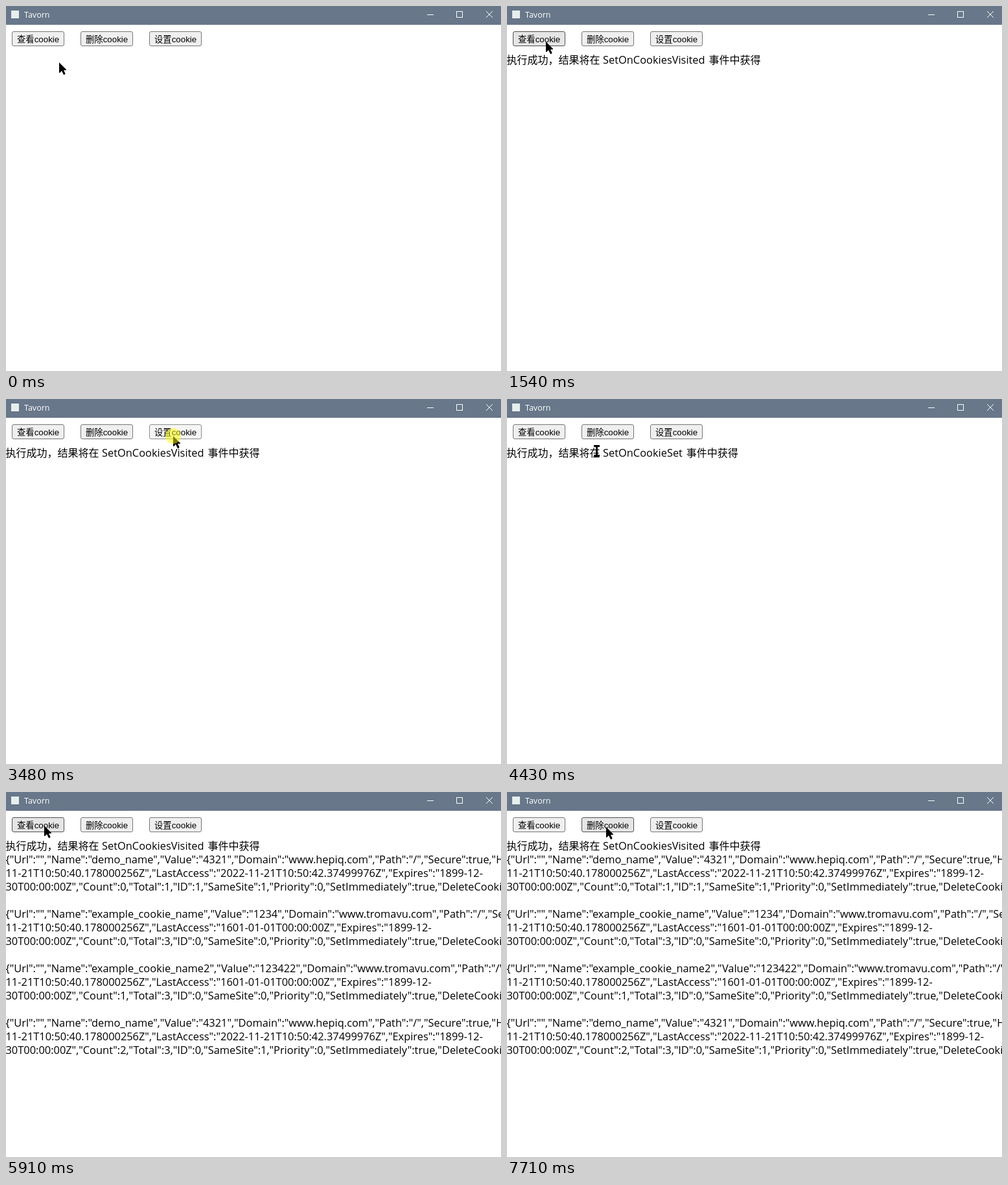
Recreate the animation shown at these times as an HTML page with a canvas. Size 764 px wide and 563 px high, loop 8 s.

```html
<!DOCTYPE html>
<html lang="zh-CN">
<head>
<meta charset="utf-8">
<title>Cookie demo</title>
<style>
html, body { margin: 0; width: 100%; height: 100%; overflow: hidden; background: #fff; }
canvas { display: block; }
</style>
</head>
<body>
<canvas id="stage" width="764" height="563"></canvas>
<script>
const ctx = document.getElementById('stage').getContext('2d');
const LOOP = 8000, TICK = 66.6;
const LATIN = '16.4px "Open Sans", sans-serif';
const HAN = '16px "Noto Sans CJK SC", "Noto Sans CJK", sans-serif';
const BUTTON_HAN = '13.333px "Noto Sans CJK SC", "Noto Sans CJK", sans-serif';
const BUTTON_LATIN = '13.333px "Liberation Sans", Arial, sans-serif';

const buttons = [[9, '查看'], [115, '删除'], [221, '设置']];

// Pointer moves: start time, steps, then [progress, x, y] points to pass through
const moves = [
  [660, 6, [[0, 82, 87], [1, 60, 55]]],
  [2000, 12, [[0, 60, 55], [7 / 12, 148, 55], [1, 258, 57]]],
  [4090, 12, [[0, 258, 57], [0.5, 138, 80], [1, 66, 58]]],
  [4910, 2, [[0, 66, 58], [1, 59, 52]]],
  [6770, 10, [[0, 59, 52], [0.1, 62, 51], [1, 158, 42]]],
  [7640, 2, [[0, 158, 42], [1, 153, 54]]]
];
const presses = [1340, 3480, 5780];
const PRESS = 130;

const messages = [
  [1470, 'SetOnCookiesVisited'],
  [3610, 'SetOnCookieSet'],
  [5910, 'SetOnCookiesVisited']
];
const DUMP_AT = 5910;

function record(name, value, domain, access, count, total, id, site) {
  return [
    `{"Url":"","Name":"${name}","Value":"${value}","Domain":"${domain}","Path":"/","Secure":true,"Httponly"`,
    `11-21T10:50:40.178000256Z","LastAccess":"${access}","Expires":"1899-12-`,
    `30T00:00:00Z","Count":${count},"Total":${total},"ID":${id},"SameSite":${site},"Priority":0,"SetImmediately":true,"DeleteCookies"`,
    ''
  ];
}
const recent = '2022-11-21T10:50:42.37499976Z', never = '1601-01-01T00:00:00Z';
const siteA = 'www.hepiq.com', siteB = 'www.tromavu.com';
const dump = [
  record('demo_name', '4321', siteA, recent, 0, 1, 1, 1),
  record('example_cookie_name', '1234', siteB, never, 0, 3, 0, 0),
  record('example_cookie_name2', '123422', siteB, never, 1, 3, 0, 0),
  record('demo_name', '4321', siteA, recent, 2, 3, 0, 1)
].flat();

// Smooth curve through the points (Lagrange)
function curve(points, u, axis) {
  return points.reduce((sum, p) => sum + points.reduce(
    (w, q) => q === p ? w : w * (u - q[0]) / (p[0] - q[0]), p[axis]), 0);
}

function pointerAt(t) {
  const move = moves.filter(m => m[0] <= t).pop();
  if (!move) return [82, 87];
  const [start, steps, points] = move;
  const u = Math.min(steps, Math.floor((t - start) / TICK) + 1) / steps;
  return [1, 2].map(axis => Math.round(curve(points, u, axis)));
}

function text(str, x, y, font, color = '#000') {
  ctx.font = font;
  ctx.fillStyle = color;
  ctx.fillText(str, x, y);
}

function line(...pts) {
  ctx.beginPath();
  for (let i = 0; i < pts.length; i += 2) ctx.lineTo(pts[i], pts[i + 1]);
}

function titleBar() {
  ctx.fillStyle = '#68778a';
  ctx.fillRect(0, 0, 764, 29);
  ctx.fillStyle = '#e6eeee';
  ctx.fillRect(8, 7, 12, 12);
  text('Tavorn', 28, 18, '12.5px "Open Sans", sans-serif', '#fff');
  ctx.strokeStyle = '#fff';
  ctx.lineWidth = 1;
  line(650, 13.5, 660, 13.5);
  ctx.stroke();
  ctx.strokeRect(695.5, 8.5, 9, 9);
  line(741, 8, 751, 18);
  ctx.stroke();
  line(751, 8, 741, 18);
  ctx.stroke();
}

function button([x, label], hover, down) {
  const [fill, edge] = hover ? (down ? ['#f5f5f5', '#8d8d8d'] : ['#e5e5e5', '#4f4f4f'])
    : ['#efefef', '#767676'];
  ctx.beginPath();
  ctx.roundRect(x + 0.5, 39.5, 80, 22, 2.5);
  ctx.fillStyle = fill;
  ctx.fill();
  ctx.strokeStyle = edge;
  ctx.lineWidth = 1;
  ctx.stroke();
  text(label, x + 8, 56, BUTTON_HAN);
  text('cookie', x + 34.7, 56, BUTTON_LATIN);
}

function output(t) {
  const msg = messages.filter(m => m[0] <= t).pop();
  if (!msg) return false;
  text('执行成功，结果将在', -0.5, 89, HAN);
  text(msg[1], 148, 89, LATIN);
  const end = 148 + ctx.measureText(msg[1]).width;
  text('事件中获得', end + 5.8, 89, HAN);
  if (t >= DUMP_AT) dump.forEach((row, i) => text(row, -0.5, 110 + i * 21, LATIN));
  return true;
}

function pointer(x, y, beam) {
  ctx.fillStyle = '#000';
  if (beam) {
    ctx.fillRect(x - 4, y - 9, 9, 3);
    ctx.fillRect(x - 1, y - 9, 3, 18);
    ctx.fillRect(x - 4, y + 6, 9, 3);
    return;
  }
  line(x, y, x, y + 16, x + 1, y + 16, x + 4, y + 13, x + 7, y + 19,
    x + 9, y + 18.5, x + 9.5, y + 17, x + 7, y + 12, x + 11, y + 12, x + 11, y + 11);
  ctx.fill();
}

function draw(t) {
  const [x, y] = pointerAt(t);
  const down = presses.some(p => t >= p && t < p + PRESS);
  ctx.fillStyle = '#fff';
  ctx.fillRect(0, 0, 764, 563);
  titleBar();
  for (const b of buttons) {
    button(b, x >= b[0] && x < b[0] + 81 && y >= 39 && y < 62, down);
  }
  const hasText = output(t);
  pointer(x, y, hasText && y >= 73);
  if (down) {
    ctx.beginPath();
    ctx.arc(x, y, 12, 0, Math.PI * 2);
    ctx.fillStyle = 'rgba(255, 255, 0, 0.5)';
    ctx.fill();
  }
}

function frame() {
  draw(performance.now() % LOOP);
  requestAnimationFrame(frame);
}
frame();
</script>
</body>
</html>
```
